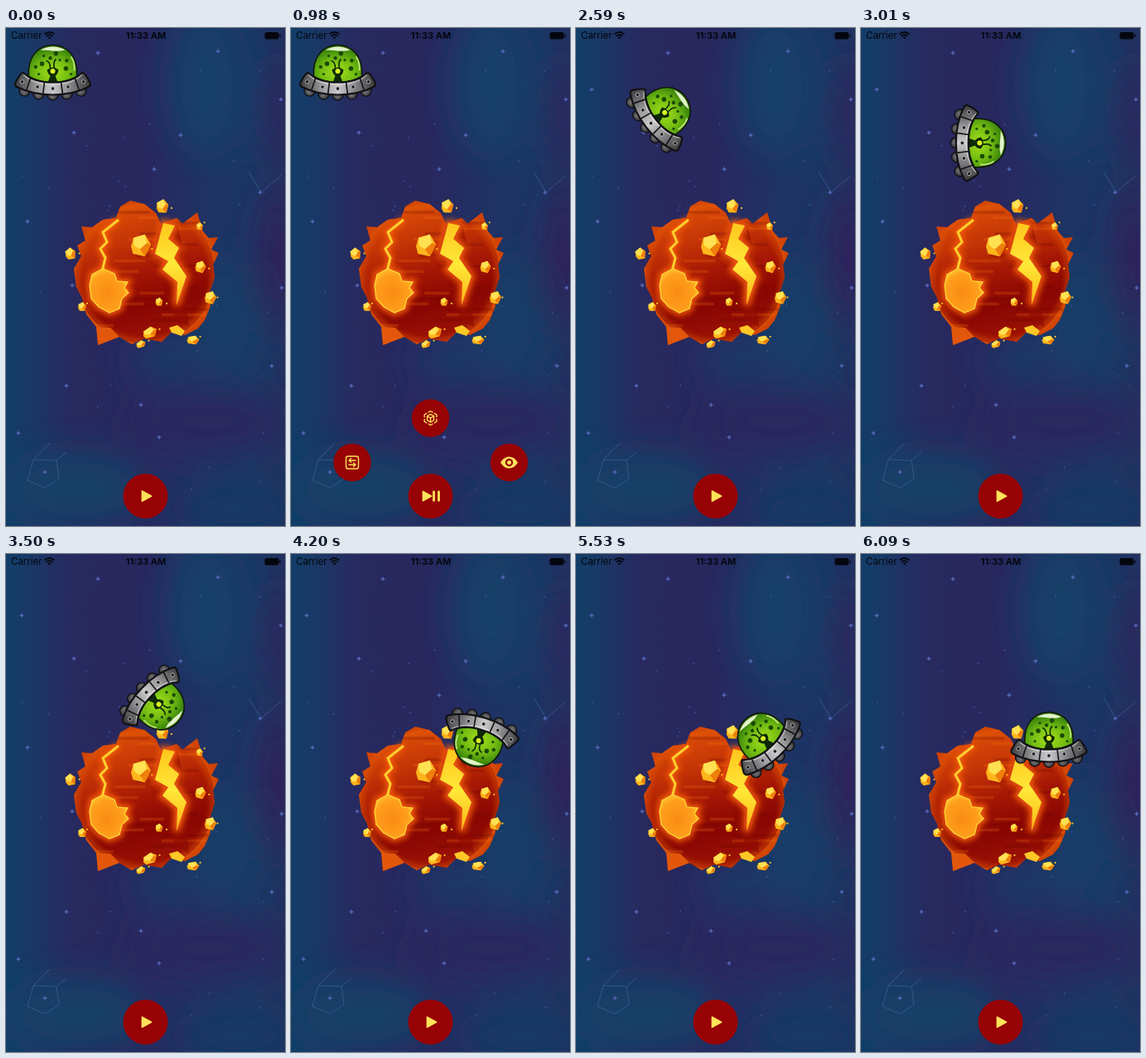
Recreate the animation shown at these times as an HTML page. Size 337 by 600 pixels, loop 6160 ms.

```html
<!DOCTYPE html>
<html lang="en">
<head>
<meta charset="utf-8">
<title>Space menu</title>
<style>
  html, body { margin: 0; width: 100%; height: 100%; overflow: hidden; background: #26295f; }
  svg { display: block; width: 100%; height: 100%; }
  .status { font: 11.5px Inter, Roboto, sans-serif; fill: #05070f; }
  .note { font: 900 14.6px Lato, "Open Sans", sans-serif; fill: #ffe13c; }
  .line { fill: none; stroke: #ffe25a; stroke-width: 1.4; stroke-linecap: round; stroke-linejoin: round; }
</style>
</head>
<body>
<svg viewBox="0 0 337 600" preserveAspectRatio="none">
  <defs>
    <linearGradient id="sky">
      <stop offset="0" stop-color="#123e68"/>
      <stop offset=".09" stop-color="#1a3866"/>
      <stop offset=".24" stop-color="#28295f"/>
      <stop offset=".5" stop-color="#28285f"/>
      <stop offset=".72" stop-color="#1f3365"/>
      <stop offset=".88" stop-color="#1b3765"/>
      <stop offset="1" stop-color="#233160"/>
    </linearGradient>
    <linearGradient id="lava" x1=".35" y1="0" x2=".6" y2="1">
      <stop offset="0" stop-color="#dc4f08"/>
      <stop offset=".28" stop-color="#c23206"/>
      <stop offset=".5" stop-color="#a31504"/>
      <stop offset=".72" stop-color="#880603"/>
      <stop offset="1" stop-color="#a01505"/>
    </linearGradient>
    <linearGradient id="bolt" x1="0" y1="0" x2="0" y2="1">
      <stop offset="0" stop-color="#ffc61c"/>
      <stop offset=".5" stop-color="#ffe838"/>
      <stop offset="1" stop-color="#ffb416"/>
    </linearGradient>
    <radialGradient id="pool" cx=".45" cy=".55" r=".6">
      <stop offset="0" stop-color="#f98a14"/>
      <stop offset=".7" stop-color="#ff9f1c"/>
      <stop offset="1" stop-color="#ffca30"/>
    </radialGradient>
    <radialGradient id="glass" cx=".5" cy=".72" r=".75">
      <stop offset="0" stop-color="#a4df1c"/>
      <stop offset=".45" stop-color="#74bd12"/>
      <stop offset=".8" stop-color="#3f8a0c"/>
      <stop offset="1" stop-color="#2a6208"/>
    </radialGradient>
    <linearGradient id="steel">
      <stop offset="0" stop-color="#3c3c3e"/>
      <stop offset=".28" stop-color="#969698"/>
      <stop offset=".5" stop-color="#cacacc"/>
      <stop offset=".72" stop-color="#88888a"/>
      <stop offset="1" stop-color="#38383a"/>
    </linearGradient>
    <radialGradient id="foot" cx=".45" cy=".6" r=".6">
      <stop offset="0" stop-color="#77777b"/>
      <stop offset="1" stop-color="#29292c"/>
    </radialGradient>
    <filter id="haze" x="-60%" y="-60%" width="220%" height="220%"><feGaussianBlur stdDeviation="20"/></filter>
    <filter id="soft" x="-40%" y="-40%" width="180%" height="180%"><feGaussianBlur stdDeviation="3.5"/></filter>
    <path id="rock" d="M138 215 150 208 167 212 181 223 187 236 206 229 213 236 231 222 238 245 245 253 256 252 248 267 257 271 250 285 252 300 246 318 247 335 240 352 232 362 216 370 200 366 188 378 167 374 152 381 137 372 111 382 109 360 97 345 92 325 85 312 82 290 91 275 86 262 96 256 91 239 104 240 117 231 133 229Z"/>
    <path id="crater" d="M101 310 104 297 117 290 131 296 134 305 147 306 143 313 148 319 140 326 137 338 125 343 112 336 103 326Z"/>
    <path id="crack" d="M136 231 117 246 122 258 114 266 120 277 116 293"/>
    <path id="zigzag" d="M190 235 204 238 196 254 209 265 203 277 218 299 206 334 207 306 189 291 196 281 180 272Z"/>
    <clipPath id="globe"><use href="#rock"/></clipPath>
    <path id="star" d="M0-1Q.12-.12 1 0Q.12.12 0 1Q-.12.12-1 0Q-.12-.12 0-1Z"/>
  </defs>

  <rect width="337" height="600" fill="url(#sky)"/>
  <g filter="url(#haze)">
    <ellipse cx="330" cy="275" rx="26" ry="85" fill="#2d225c"/>
    <ellipse cx="337" cy="105" rx="22" ry="60" fill="#2a285f"/>
    <ellipse cx="242" cy="68" rx="44" ry="85" fill="#153f69"/>
    <ellipse cx="265" cy="350" rx="42" ry="70" fill="#153c68"/>
    <ellipse cx="190" cy="400" rx="40" ry="28" fill="#1a3768"/>
    <ellipse cx="245" cy="475" rx="95" ry="36" fill="#2b255e"/>
    <ellipse cx="85" cy="555" rx="85" ry="46" fill="#123f67"/>
    <ellipse cx="280" cy="580" rx="70" ry="32" fill="#173965"/>
  </g>
  <g fill="none" stroke="#4774a8" opacity=".5">
    <path d="M293 173 308 198 333 177"/>
    <path d="M53 500 33 520 26 545 47 554 64 543 61 521 73 511M33 520 61 521"/>
  </g>
  <g id="stars" fill="#5062ae"></g>

  <use href="#rock" fill="#cf4207"/>
  <g clip-path="url(#globe)">
    <circle cx="168" cy="296" r="84" fill="url(#lava)"/>
    <circle cx="168" cy="296" r="83" fill="none" stroke="#e8600a" stroke-width="5" filter="url(#soft)" opacity=".7"/>
    <g id="bands" stroke-width="3.5" opacity=".22"></g>
    <path d="M187 235 177 273 190 290 192 323 206 352 221 360 217 321 223 299 210 285 214 266 207 237Z" fill="#8f0b02" opacity=".65"/>
    <path d="M109 360 126 361 137 372 111 383Z" fill="#e2570c"/>
  </g>
  <g fill="none" stroke="#f45a07" stroke-width="8" filter="url(#soft)">
    <use href="#crack"/><use href="#crater"/><use href="#zigzag"/>
  </g>
  <use href="#crack" fill="none" stroke="#ffd02a" stroke-width="3"/>
  <use href="#crater" fill="url(#pool)" stroke="#ffd733" stroke-width="1.3"/>
  <use href="#zigzag" fill="url(#bolt)"/>
  <path d="M197 361 207 358 216 365 212 371 200 367Z" fill="#ffc726"/>
  <g id="crumbs" fill="#ffc629"></g>
  <g id="gems"></g>

  <g id="menu"></g>
  <circle cx="168.5" cy="564" r="27" fill="#970204"/>
  <g fill="#ffe25a" stroke="#ffe25a" stroke-width="1.8" stroke-linejoin="round">
    <path id="play" d="M164.5 558 175.500 564 164.500 570Z"/>
    <path id="toggle" d="M159.500 558.500 169.500 564 159.500 569.500ZM172 558.500H173V569.500H172ZM178 558.500H179V569.500H178Z"/>
  </g>

  <g id="banner">
    <rect x="80" width="257" height="58" fill="#8f0614"/>
    <path d="M107 24 98 33H104L101 41 112 31H106L110 24Z" fill="#ffe13c"/>
    <text class="note" x="118" y="36">Animation added successfully!</text>
  </g>

  <g id="ufo">
    <g id="feet" fill="url(#foot)" stroke="#111113" stroke-width="1.4"></g>
    <path d="M-29 5C-31-18-18-33 0-33S31-18 29 5Q0 20-29 5Z" fill="url(#glass)" stroke="#10180a" stroke-width="1.6"/>
    <path d="M-15-27Q0-35 15-27Q8-25 0-26T-15-27Z" fill="#f4ffe0" opacity=".9"/>
    <path d="M22-19Q27-12 26-2" fill="none" stroke="#d4f593" stroke-width="1.8" opacity=".8"/>
    <g id="spots" fill="#1c4a08"></g>
    <path d="M-3-5Q-3-13-8-14M2-5Q0-13 4-16" fill="none" stroke="#0d2906" stroke-width="1.6"/>
    <path d="M-7-3Q0-9 7-3Q6 3 3 4L6 12H-6L-3 4Q-6 2-7-3Z" fill="#0d2906"/>
    <circle cy="-1.500" r="3" fill="#d8ef25"/>
    <path d="M-36 0Q-24 12 0 12T36 0Q39 1 45 12Q47 16 42 18Q24 27 0 27T-42 18Q-47 16-45 12Q-39 1-36 0Z" fill="url(#steel)" stroke="#111113" stroke-width="2.200" stroke-linejoin="round"/>
    <path d="M-35 3Q-23 14.500 0 14.500T35 3" fill="none" stroke="#eee" stroke-width="1.200" opacity=".6"/>
    <g id="panels" stroke="#161618" stroke-width="1.700"></g>
    <g id="rivets" fill="#1b1b1d" stroke="#d8d8da" stroke-width=".7"></g>
  </g>

  <g class="status">
    <text x="6" y="13">Carrier</text>
    <text x="169" y="13" text-anchor="middle" font-weight="700" font-size="11">11:33 AM</text>
    <path d="M46.500 7.500Q52.500 2.500 58.500 7.500M48.700 9.900Q52.500 6.600 56.300 9.900" fill="none" stroke="#05070f" stroke-width="1.700"/>
    <path d="M50.500 11.300Q52.500 9.700 54.500 11.300L52.500 13.500Z"/>
    <rect x="312.500" y="5" width="17" height="8.500" rx="2.300"/>
    <rect x="330.300" y="7.500" width="1.300" height="3.500" rx=".6"/>
  </g>
</svg>
<script>
const LOOP = 6160, STEP = 70;
const $ = id => document.getElementById(id);
const clamp = v => Math.min(1, Math.max(0, v));
const span = (t, from, length) => clamp((t - from) / length);
const smooth = p => p * p * (3 - 2 * p);
const mix = (a, b, p) => a + (b - a) * p;
const dot = (x, y, r) => `<circle cx="${x}" cy="${y}" r="${r}"/>`;
const repeat = (n, make) => Array.from({ length: n }, (_, i) => make(i)).join('');
const fill = (id, markup) => { $(id).innerHTML = markup; };

let seed = 7;
const random = (a, b) => {
  seed = seed * 16807 % 2147483647;
  return mix(a, b, seed / 2147483647);
};

// Main stars at key points, faint ones scattered
const stars = [[111,30],[256,28],[19,74],[82,126],[211,129],[179,170],[26,233],[80,310],[333,313],
  [73,431],[15,488],[163,454],[185,493],[321,407],[332,86],[307,198],[47,535]];
fill('stars',
  stars.map(([x, y]) => `<use href="#star" transform="translate(${x} ${y}) scale(3.6)"/>${dot(x, y, 1.5)}`).join('') +
  `<g opacity=".6">${repeat(30, () => dot(random(0, 337), random(20, 600), 1))}</g>`);

// Planet texture and loose crystals (x, y, radius)
fill('bands', repeat(22, i => {
  const x = random(95, 200), y = 222 + i * 6.500;
  return `<path d="M${x} ${y}h${random(25, 60)}" stroke="${i % 2 ? '#ff7a10' : '#600000'}"/>`;
}));
const gems = [[163,262,12],[189,215,7.500],[78,272,6.500],[235,288,6.500],[185,330,4.500],
  [174,367,9],[247,325,7],[92,336,5],[163,381,6],[226,376,7.500],[234,239,4]];
fill('gems', gems.map(([x, y, r], i) => {
  const flat = y > 360 ? .7 : 1.100;
  return `<g transform="translate(${x} ${y}) rotate(${i % 3 * -12}) scale(${r} ${r * flat})">
    <path d="M-.75-.7.4-1 1-.1.4 1-.8.75-1 .1Z" fill="#ffb51c"/>
    <path d="M-.75-.7.4-1 .6-.2-.1.35-.7 0Z" fill="#ffe152"/>
    <path d="M-.1.35.6-.2 1-.1.4 1Z" fill="#ef7f0c"/></g>`;
}).join(''));
fill('crumbs', gems.map(([x, y, r]) => dot(x + r + random(1, 5), y - random(-4, 5), 1.100)).join(''));

// Saucer details follow the curve of the rim
const sag = x => -x * x / 165;
fill('feet', repeat(5, i => { const x = (i - 2) * 17; return dot(x, 27 + sag(x) * .7, 6.500); }));
fill('rivets', repeat(5, i => { const x = (i - 2) * 18.500; return dot(x, 19.500 + sag(x), 2.200); }));
fill('panels', [-27, -10, 10, 27].map(x =>
  `<path d="M${x} ${12 + sag(x)}L${x * 1.180} ${26 + sag(x)}"/>`).join(''));
fill('spots', repeat(10, i => {
  const a = Math.PI * (1 - i / 9), r = i % 2 ? 22 : 17;
  return dot(r * Math.cos(a), 2 - r * 1.150 * Math.sin(a), 1.600 + i % 3 * .6);
}));

// Menu buttons fly out from the main one
const hub = [168.5, 564];
const corners = repeat(6, i => `<path class="line" d="M-2.500-7 0-8.500 2.500-7" transform="rotate(${i * 60})"/>`);
const buttons = [
  { at: [168.5, 470], icon: corners + `<path class="line" d="M0 0V5M0 0-4-2.500M0 0 4-2.500M-4-2.500V2.500L0 5 4 2.500V-2.500L0-4.700Z"/>` },
  { at: [74, 523.5], icon: `<rect class="line" x="-7.500" y="-7.500" width="15" height="15" rx="2.500"/>
    <path class="line" d="M4-2.500H-4L-1.500-5M-4-2.500-1.500-.300M-4 2.700H4L1.500.400M4 2.700 1.500 5"/>` },
  { at: [263.5, 523.5], icon: `<path d="M-10.500 0Q-6-7 0-7T10.500 0Q6 7 0 7T-10.500 0Z" fill="#ffe25a"/>
    <circle r="4.700" fill="#970204"/><circle r="2.500" fill="#ffe25a"/>` }
];
fill('menu', buttons.map(b => `<g><circle r="22.700" fill="#970204"/>${b.icon}</g>`).join(''));
const nodes = [...$('menu').children];

const move = (el, x, y, turn = 0) => el.setAttribute('transform', `translate(${x} ${y}) rotate(${turn})`);
const show = (el, on) => { el.style.display = on ? '' : 'none'; };

function draw(t) {
  const open = smooth(span(t, 210, 560)) - smooth(span(t, 1960, 420));
  buttons.forEach(({ at }, i) => move(nodes[i], mix(hub[0], at[0], open), mix(hub[1], at[1], open)));
  show($('menu'), open > 0);

  const active = t >= 280 && t <= 1960;
  show($('play'), !active);
  show($('toggle'), active);

  const drop = smooth(span(t, 1330, 280)) - smooth(span(t, 1820, 280));
  move($('banner'), 0, -58 * (1 - drop));

  const go = span(t, 2010, 2000);
  move($('ufo'), mix(56.5, 227, go), mix(53.5, 223.5, go), 360 * span(t, 2010, 4000));
}

const start = performance.now();
function tick(now) {
  const t = Math.max(0, now - start) % LOOP;
  draw(Math.floor(t / STEP) * STEP);
  requestAnimationFrame(tick);
}
draw(0);
requestAnimationFrame(tick);
</script>
</body>
</html>
```
